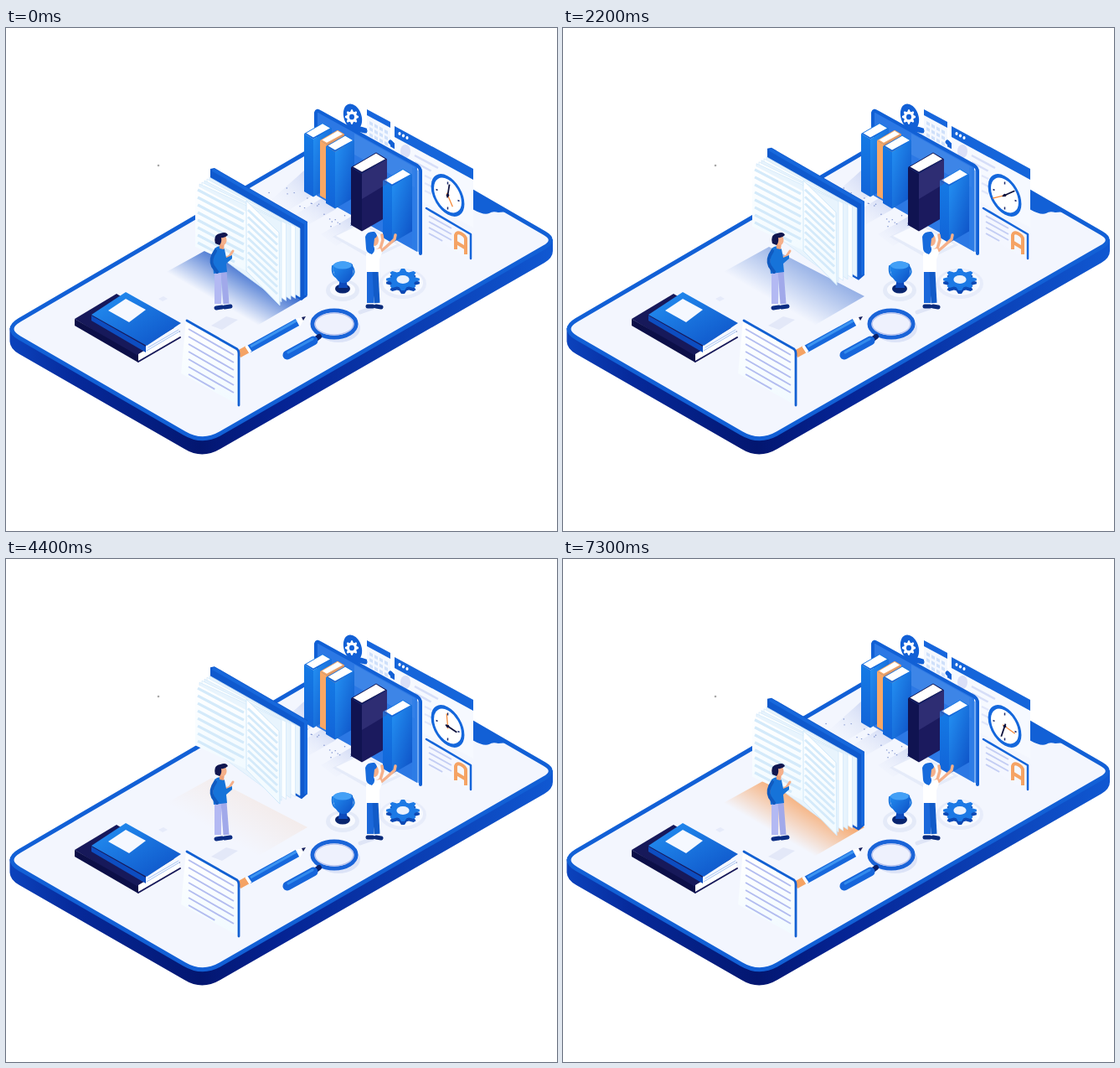
These frames come from a looping animation (658x600 px, 7400 ms). An HTML page:

```html
<!DOCTYPE html>
<html lang="en">
<head>
<meta charset="utf-8">
<title>Online library</title>
<style>
  html, body { margin: 0; width: 100%; height: 100%; overflow: hidden; background: #fff; }
  svg { display: block; width: 658px; height: 600px; }
</style>
</head>
<body>
<svg viewBox="0 0 658 600">
  <defs>
    <linearGradient id="side">
      <stop offset="0" stop-color="#0c43bd"/><stop offset=".12" stop-color="#06299a"/>
      <stop offset=".35" stop-color="#031670"/><stop offset=".5" stop-color="#052393"/>
      <stop offset="1" stop-color="#1058d2"/>
    </linearGradient>
    <linearGradient id="shade" gradientUnits="userSpaceOnUse" x1="306" y1="284" x2="274" y2="339">
      <stop offset="0" stop-color="currentColor"/>
      <stop offset=".45" stop-color="currentColor" stop-opacity=".55"/>
      <stop offset="1" stop-color="currentColor" stop-opacity="0"/>
    </linearGradient>
    <linearGradient id="blue" x2="1" y2="1">
      <stop offset="0" stop-color="#2492f4"/><stop offset="1" stop-color="#0d50c5"/>
    </linearGradient>
    <linearGradient id="spine" x2="0" y2="1">
      <stop offset="0" stop-color="#147ae5"/><stop offset="1" stop-color="#1264d8"/>
    </linearGradient>
    <linearGradient id="paper" x2="0" y2="1">
      <stop offset="0" stop-color="#fff"/><stop offset="1" stop-color="#f1faff"/>
    </linearGradient>
    <linearGradient id="streak" x1="1" y1="0" x2="0" y2="1">
      <stop offset="0" stop-color="#c9d3f2"/><stop offset="1" stop-color="#eef2fc" stop-opacity="0"/>
    </linearGradient>
  </defs>

  <!-- Phone -->
  <path fill="url(#side)" d="M4.5 358V374Q5 383 16 389L213 502Q234 515 256 502L643 280Q653 274 653 266V252Z"/>
  <path fill="#f3f6fe" stroke="#1260d6" stroke-width="5"
    d="M16 348.300L400 124.500Q417 114.600 434 124L643 244.700Q657.600 253 643 261.500L256 483.700Q234.700 496 213 483.300L16 369.600Q-2 359 16 348.300Z"/>
  <path fill="#1260d6" d="M555 193L600 219L588 220Q581 218 577 221Q571 224 557 216Z"/>

  <g id="back"></g>
  <g id="shelf"></g>
  <path id="shadow" fill="url(#shade)" d="M188 293L246 261L360 320L298 356Z"/>
  <g id="book"></g>
  <g id="front"></g>

  <g id="clock" transform="translate(527.500 199.500)">
    <circle r="21" transform="matrix(.866 .46 0 1 0 0)" fill="#fff" stroke="#1467dc" stroke-width="4"/>
    <path stroke="#1b2a6b" stroke-width="1.500" d="M0 -16v3M0 14v3M-14 -7l2 1M12 6l2 1"/>
    <path id="second" stroke="#f58b3c" stroke-width="1.300" d="M0 3V-15"/>
    <path id="minute" stroke="#10143f" stroke-width="1.800" d="M0 3V-13"/>
    <circle r="1.800" fill="#10143f"/>
  </g>
</svg>

<script>
const el = id => document.getElementById(id);
const poly = (points, fill, extra = '') => `<polygon points="${points}" fill="${fill}" ${extra}/>`;
const oval = (x, y, rx, ry, fill, extra = '') =>
  `<ellipse cx="${x}" cy="${y}" rx="${rx}" ry="${ry}" fill="${fill}" ${extra}/>`;
const line = (d, color, width, cap = 'round') =>
  `<path d="${d}" fill="none" stroke="${color}" stroke-width="${width}" stroke-linecap="${cap}" stroke-linejoin="round"/>`;

// Parallel slanted text lines; the last one is shortened.
function rules(x, y, dx, dy, count, pitch, color, width, last = 1) {
  let d = '';
  for (let i = 0; i < count; i++) {
    const k = i === count - 1 ? last : 1;
    d += `M${x} ${y + i * pitch}l${dx * k} ${dy * k}`;
  }
  return line(d, color, width, 'butt');
}

// Upright book: spine width w, depth d, height h; (x, y) is its left top corner.
function uprightBook(x, y, w, d, h, spine, cover) {
  const s = w * .58, r = d * .58, a = x + w, b = y + s;
  return poly([x, y, a, b, a, b + h, x, y + h], spine) +
    poly([a, b, a + d, b - r, a + d, b - r + h, a, b + h], cover) +
    poly([x, y, x + d, y - r, a + d, b - r, a, b], spine) +
    poly([x + 2.5, y - 0.5, x + d, y - r + 1, a + d - 2, b - r, a, b - 2], '#fff');
}

function gear(x, y, r, squash, fill, hole) {
  const points = [];
  for (let i = 0; i < 32; i++) {
    const a = (i - .5) / 32 * 2 * Math.PI, q = i % 4 < 2 ? r : r * .75;
    points.push((x + q * Math.cos(a)).toFixed(1), (y + q * squash * Math.sin(a)).toFixed(1));
  }
  return poly(points, fill) + oval(x, y, r * .38, r * .38 * squash, hole);
}

function backWall() {
  let cells = '';
  for (let r = 0; r < 3; r++)
    for (let c = 0; c < 4; c++) {
      const x = 434 + c * 6, y = 111 + r * 7 + c * 3.3;
      cells += poly([x, y, x + 4, y + 2.2, x + 4, y + 6, x, y + 4], '#cfe0fa');
    }
  return poly([431, 97, 459, 112, 459, 143, 431, 126], '#f4f8ff') +
    poly([431, 97, 459, 112, 459, 119, 431, 104], '#1766dc') + cells +
    line('M416 120l13 3M459 136l4 4', '#1260d6', 5) +
    oval(414, 106, 10.5, 16, '#1260d6', 'transform="rotate(-18 414 106)"') +
    gear(413, 106, 8, 1.1, '#fff', '#1260d6') +
    poly([464, 128, 558, 179, 558, 238, 464, 190], '#f6f9ff') +
    poly([464, 117, 558, 168, 558, 181, 464, 130], '#1565da') +
    oval(470, 126, 1.6, 2, '#fff') + oval(474.5, 128.5, 1.6, 2, '#fff') + oval(479, 131, 1.6, 2, '#fff') +
    oval(477, 147, 6, 8, '#dadff7') +
    rules(488, 152, 28, 15, 2, 8, '#d6def8', 2.5, .7) +
    rules(500, 176, 8, 4, 3, 9, '#e0e6fa', 2) +
    poly([502, 215, 555, 246, 555, 276, 502, 246], '#f4f7ff') +
    line('M502 215L555 246V275', '#1565da', 2.5) +
    rules(505, 224, 27, 15, 4, 7, '#c4cef4', 2, .6) +
    line('M537 264V247Q538 243 543 245Q549 248 549 252V270M538 256L548 262', '#f5a364', 4, 'butt');
}

function shelf() {
  let dots = '', seed = 7;
  const rand = () => (seed = seed * 16807 % 2147483647) / 2147483647;
  for (let i = 0; i < 26; i++) {
    const u = rand() * 100, v = rand() * 34;
    dots += oval(336 + u - v * .7, 184 + u * .56 + v * .4, .8, .7, '#7f93cf');
  }
  return poly([356, 170, 366, 200, 338, 217, 318, 204], 'url(#streak)') +
    poly([382, 200, 394, 216, 357, 237, 340, 226], 'url(#streak)') +
    poly([412, 225, 425, 243, 394, 260, 376, 246], 'url(#streak)') + dots +
    poly([390, 249, 424, 231, 472, 259, 437, 276], '#e5ebf9') +
    poly([394, 248, 424, 234, 467, 258, 437, 271], '#f8faff') +
    poly([371, 97, 491, 163, 491, 267, 371, 200], '#2c78e4') +
    poly([416, 126, 488, 166, 488, 190, 416, 151], '#4c91ec', 'opacity=".55"') +
    line('M370 118V101Q371 97 375 100L491 164Q495 167 495 171V269', '#1160d5', 4) +
    uprightBook(356, 126, 11, 22, 69, 'url(#spine)', 'url(#blue)') +
    uprightBook(375, 134, 8, 21, 66, '#f8a765', '#ef9857') +
    uprightBook(382, 141, 11, 23, 68, 'url(#spine)', 'url(#blue)') +
    uprightBook(412, 166, 13, 30, 69, '#101351', '#1b1a5e') +
    uprightBook(450, 182, 11, 24, 68, 'url(#spine)', 'url(#blue)') +
    poly([425, 174, 455, 157, 455, 186, 425, 204], '#51509a', 'opacity=".35"') +
    poly([485, 166, 494, 171, 494, 268, 485, 263], '#2f7ee8', 'opacity=".65"');
}

function openBook() {
  let leaves = '';
  for (let i = 0; i < 5; i++) {
    const x = 351 - i * 5.5, y = 239 - i * 2;
    leaves += poly([243 - i * 3, 178 + i * 2, x, y, x, 321 + i * 1.5, 243 - i * 3, 255],
      i % 2 ? '#fbfeff' : '#e8f4fd', 'stroke="#d0e7fa" stroke-width=".7"');
  }
  return poly([244, 168, 249, 167, 360, 231, 360, 319, 353, 325, 244, 262], '#0f59cd') +
    line('M247 169L358 233V319', '#1768dc', 4, 'butt') + leaves +
    poly([226, 187, 287, 219, 288, 290, 226, 261], 'url(#paper)') +
    rules(229, 193, 55, 29, 8, 9, '#d4eafa', 3.2, .8) +
    poly([287, 206, 326, 244, 327, 331, 287, 290], 'url(#paper)', 'stroke="#cfe8fa" stroke-width="1"') +
    rules(289, 217, 35, 33, 9, 8.4, '#d4eafa', 2.8);
}

function deskItems() {
  return poly([245, 355, 263, 344, 277, 348, 258, 360], '#e3e8f8') +
    poly([182, 323, 188, 320, 193, 323, 187, 326], '#e6ebfa') +
    // Stacked books
    poly([82, 347, 132, 317, 208, 362, 158, 393], '#17195a') +
    poly([82, 347, 158, 391, 158, 399, 82, 355], '#0c0f48') +
    poly([158, 389, 207, 360, 207, 370, 158, 397], '#fff') +
    line('M158 398L208 369', '#17195a', 2) +
    poly([102, 343, 167, 380, 167, 387, 102, 349], '#0d4dc0') +
    poly([167, 378, 207, 354, 207, 362, 167, 385], '#f5f8ff') +
    line('M168 385L207 362M170 381L206 360', '#a9c5f3', 1) +
    poly([102, 342, 143, 315, 209, 352, 168, 379], 'url(#blue)') +
    poly([122, 337, 143, 323, 167, 336, 147, 351], '#f5f8ff') +
    // Pencil and note
    line('M290 383L348 351', '#1768dc', 9, 'butt') +
    line('M292 380L347 349', '#3c94f1', 3, 'butt') +
    poly([346, 347, 358, 344, 351, 356], '#fff') + poly([353, 345, 358, 344, 355, 349], '#15205e') +
    line('M278 389L288 383.500', '#f5a364', 9, 'butt') + line('M288 384L291 382', '#fff', 9, 'butt') +
    poly([215, 348, 278, 385, 278, 450, 209, 412], 'url(#paper)') +
    line('M216 349L276 383Q278 385 278 388V450', '#1260d2', 2.8) +
    rules(218, 359, 54, 31, 7, 9, '#b3bdf0', 2, .58) +
    // Magnifier
    oval(397, 358, 26, 17, '#dce3f7') + oval(392, 353, 26, 16, '#eef1fd') +
    oval(392, 353, 26, 16, 'none', 'stroke="#1a64d8" stroke-width="5"') +
    oval(392, 353, 23, 13, 'none', 'stroke="#b9c4ee" stroke-width="1.5"') +
    line('M374 368l-4 3', '#0b2169', 6) +
    line('M367 373L336 390', '#1665da', 11) + line('M366 371L337 387', '#328bed', 3) +
    // Trophy and gear
    oval(402, 313, 20, 13, '#e4eaf8') + oval(402, 312, 15, 9, '#f8faff') +
    oval(402, 311, 9, 5.5, '#09256f') + poly([399, 298, 406, 298, 408, 310, 397, 310], '#0e4abb') +
    line('M390 284Q388 298 400 299M413 284Q420 293 408 300', '#1976df', 2) +
    '<path fill="url(#blue)" d="M390 283Q401 274 414 282Q416 298 408 303Q402 306 397 302Q391 296 390 283Z"/>' +
    oval(402, 283, 11, 4.5, '#43a0f6') +
    oval(474, 305, 28, 18, '#e7ecfa') + oval(474, 304, 24, 15, '#f8faff') +
    gear(474, 304, 20, .65, '#0c49b5', '#eef3fd') + gear(474, 300, 20, .65, '#1c79e5', '#eaf1fd');
}

function people() {
  return line('M253 291V329', '#b3b9f3', 8, 'butt') + line('M260 290L263 329', '#a1a9ea', 7, 'butt') +
    line('M251 334L258 333M261 333L268 332', '#0b2d83', 5) +
    line('M261 275L267 272L271 266', '#f5b08a', 3) +
    '<path fill="#1673d9" d="M249 263Q256 257 261 264L263 274L270 271V275L263 281L264 291L248 293Q246 277 249 263Z"/>' +
    line('M250 266Q243 276 247 284L252 291', '#105ac0', 4) +
    poly([255, 257, 261, 256, 260, 264, 255, 263], '#efa27b') + oval(259, 253, 4.5, 6, '#f5b08a') +
    '<path fill="#10164f" d="M250 257Q247 246 256 245Q263 242 265 247Q261 251 257 250Q258 256 255 259Z"/>' +
    line('M423 339L443 332', '#dfe5f6', 5) +
    line('M435 290V328', '#1b68da', 8, 'butt') + line('M441 290L443 328', '#125bc8', 7, 'butt') +
    line('M432 332H438M442 332L448 333', '#0a2b7b', 5) +
    line('M439 268L447 263L450 253L449 247M443 270L454 261L464 252L465 247', '#f5b08a', 3.5) +
    '<path fill="#fff" d="M430 270Q433 262 441 264L447 263L449 268L446 276V291H430Z"/>' +
    oval(440, 253, 5, 7, '#f5b08a') +
    '<path fill="#176bdc" d="M429 249Q431 242 440 243Q446 248 440 251L439 260Q442 266 437 270Q430 268 430 263Z"/>';
}

el('back').innerHTML = backWall();
el('shelf').innerHTML = shelf();
el('book').innerHTML = openBook();
el('front').innerHTML = deskItems() + people() + oval(182, 164, 1.3, 1.2, '#a9a9a9');

const LOOP = 7400, PEAK = 4000, STEP = 100;

function draw(now) {
  const t = Math.floor(now % LOOP / STEP) * STEP;
  const rising = t < PEAK;
  const height = rising ? t / PEAK : (LOOP - t) / (LOOP - PEAK);
  el('book').setAttribute('transform', `translate(0 ${(-44 * height).toFixed(2)})`);
  el('shadow').setAttribute('opacity', 1 - height);
  el('shade').setAttribute('color', rising ? '#1450c4' : '#f79a53');
  el('second').setAttribute('transform', `rotate(${157 + t * .045})`);
  el('minute').setAttribute('transform', `rotate(${9 + t * .026})`);
  requestAnimationFrame(() => draw(performance.now()));
}
draw(0);
</script>
</body>
</html>
```
